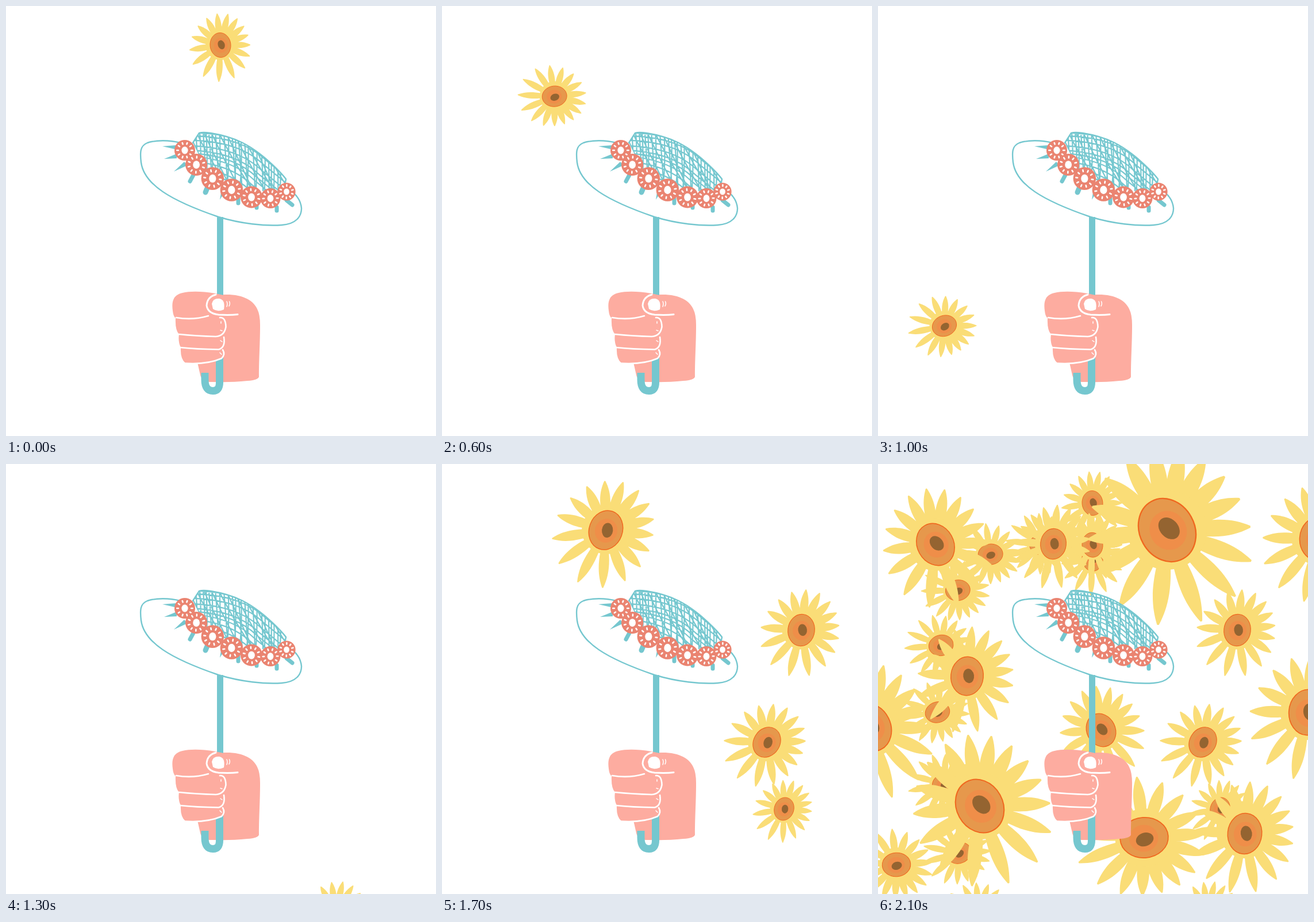
An HTML page for the animation above (2.2 s loop, 748x748 px).

```html
<!DOCTYPE html>
<html lang="en">
<head>
<meta charset="utf-8">
<title>Sunflowers and straw hat</title>
<style>
  html, body { margin: 0; width: 100%; height: 100%; overflow: hidden; background: #fff; }
  svg { display: block; width: 100vw; height: 100vh; }
  .teal { fill: none; stroke: #75c7cf; stroke-linecap: round; stroke-linejoin: round; }
  .leaf { fill: #75c7cf; stroke: none; }
  .skin { fill: #fdaca0; }
  .white { fill: none; stroke: #fff; stroke-width: 2.6; stroke-linecap: round; }
</style>
</head>
<body>
<svg viewBox="0 0 748 748">
  <defs>
    <g id="sunflower">
      <path id="petals" fill="#fadd77"/>
      <circle r="26" fill="#fadd77"/>
      <g transform="rotate(-6)">
        <ellipse rx="18" ry="21.5" fill="#e6984c" stroke="#f0681f" stroke-width=".9"/>
        <ellipse cx=".5" cy=".5" rx="12" ry="13" fill="#ef8e49"/>
        <ellipse cx="1.7" rx="6" ry="8" fill="#946431" transform="rotate(-14)"/>
      </g>
    </g>
    <clipPath id="crown">
      <path d="M325 238L336 221Q342 219 356 221C400 228 425 243 450 264C465 277 480 292 487 301L485 322H440L410 318L380 303L350 288Z"/>
    </clipPath>
  </defs>

  <g id="field"></g>

  <g class="teal" stroke-width="2.4">
    <path d="M303 238C285 233 260 233 246 238C233 243 233 255 235 272C240 310 285 338 370 367C410 379 450 383 480 381C505 379 514 366 514 352C513 340 508 332 500 325"/>
    <path d="M325 238L336 221Q342 219 356 221C400 228 425 243 450 264C465 277 480 292 487 301L485 312"/>
    <g clip-path="url(#crown)"><path id="weave" stroke-width="2.2"/></g>
    <path class="leaf" d="M272 244L298 242V250ZM275 266L297 257V265ZM292 288L310 271L316 277ZM372 337L375 318L382 321Z"/>
    <path stroke-width="7" d="M320 305L327 292M404 343V334M436 351V344M471 356V350M498 346L488 338"/>
    <path stroke-width="9" d="M347 324L352 312"/>
  </g>
  <g id="band"></g>

  <path class="skin" d="M366 503C400 499 427 506 437 527Q442 537 442 555C442 590 440 610 440 645Q438 651 420 652C395 655 370 654 354 654Q340 652 338 642L333 620Z"/>
  <g class="teal" style="stroke-linecap:butt">
    <path stroke-width="11" d="M372.5 367V655"/>
    <path stroke-width="13" d="M371.5 600V655Q371.5 669.5 360 669.5Q346 669.5 346 650V638"/>
  </g>

  <path class="skin" d="M378 503L364 500C340 496 320 496 307 499C290 503 288 515 290 530Q291 540 295 543Q294 564 301 571Q299 584 304 594Q303 614 312 621Q350 624 376 613Q382 605 378 597Q382 586 379 575Q384 562 382 549L404 530Z"/>
  <g class="white">
    <path d="M296 542Q325 547 352 539"/>
    <path d="M301 571Q330 574 365 575Q380 574 382.5 558Q382 541 372 542"/>
    <path d="M303 594Q330 597 370 597.5Q382 594 379 576"/>
    <path d="M311 621.5Q350 624 375 613Q382 606 377 598"/>
    <path stroke-width="3" d="M365 502Q350 506 349 521Q351 535 370 537Q390 538 403 536.5"/>
    <path style="stroke-width:1.5" d="M384 514Q386 518 384 523M388.5 514Q390.5 518 388 522M374 549V552M373 564L376 565M373 582L376 584M372 603L375 606"/>
    <path style="fill:#fff;stroke:none" d="M358 518Q360 508 371 509Q382 511 379 528Q368 533 360 527Z"/>
  </g>
</svg>
<script>
const $ = id => document.getElementById(id);
const { sin, cos, PI } = Math;
const loop = (n, make) => Array.from({ length: n }, (_, i) => make(i));

// Point on a cubic curve.
const curve = (t, ...points) => [0, 1].map(k => {
  const [a, b, c, d] = points.map(p => p[k]), u = 1 - t;
  return a * u ** 3 + 3 * b * u * u * t + 3 * c * u * t * t + d * t ** 3;
});

// Uneven ring of pointed petals; the longest one hangs straight down.
$("petals").setAttribute("d", loop(16, i => {
  const turn = i * PI / 8;
  const angle = PI / 2 + turn + .14 + .175 * sin(turn - .59);
  const length = 56 + 4 * cos(turn) + 4 * cos(2 * turn);
  const at = (along, side) => {
    const x = along * length;
    return `${x * cos(angle) - side * sin(angle)} ${x * sin(angle) + side * cos(angle)}`;
  };
  return `M0 0C${at(.5, 7.5)} ${at(.75, 7)} ${at(1, .6)}L${at(1, -.6)}C${at(.75, -7)} ${at(.5, -7.5)} 0 0Z`;
}).join(""));

// Straw weave: upright, curved and diagonal strands.
$("weave").setAttribute("d", [
  ...loop(28, i => `M${322 + i * 6.2 + 2 * sin(i * 7)} 212q5 58 ${3 + 6 * sin(i * 3)} 120`),
  ...loop(13, i => `M${336 - i * 4} ${221 + i * 7 + 2 * sin(i * 5)}q80 3 120 42q30 24 55 46`),
  ...loop(13, i => `M${298 + i * 13} 205q25 55 ${65 + 8 * sin(i * 4)} 125`)
].join(""));

// Round flowers strung along the hat band.
$("band").innerHTML = loop(7, i => {
  const [x, y] = curve(i / 6, [311, 251], [341, 300], [439, 362], [488, 323]);
  const r = 18 + 3 * sin(i * PI / 6) - i * .4;
  const dashes = loop(10, n => {
    const a = n * PI / 5 + i, c = r * cos(a), s = r * sin(a);
    return `M${c * .62} ${s * .62}L${c * .76} ${s * .76}`;
  });
  return `<g transform="translate(${x} ${y})"><circle r="${r}" fill="#ea8471"/>
    <ellipse rx="${r * .31}" ry="${r * .36}" fill="#fff"/>
    <path class="white" d="${dashes.join("")}"/></g>`;
}).join("");

const sunflower = (x, y, size, turn) =>
  `<use href="#sunflower" transform="translate(${x} ${y}) rotate(${turn}) scale(${size})"/>`;

// The small sunflower bounces on the hat, rolls off to the left and comes back from below.
function falling(step) {
  if (step < 5) return sunflower(373, 165 - 97 * (1 - Math.min(step, 3) / 2) ** 2, 1, 0);
  if (step > 12) return sunflower(573, 780, 1, 20);
  const [x, y] = curve((step - 5) / 7, [285, 140], [35, 117], [89, 568], [175, 780]);
  return sunflower(x, y, 1, 90 - 3.5 * (step - 6));
}

function field(step) {
  const late = step < 20 ? 0 : 1;
  const out = [];
  const bloom = (from, to, turn, ...spots) => {
    if (from <= step && step <= to) out.push(...spots.map(spot => sunflower(...spot, turn)));
  };

  if (step < 14) out.push(falling(step));
  if (step === 21) out.push(...loop(14, falling));

  // Climbing on the right, then leaping over the hat.
  [[595, 600, .94], [565, 484, 1.27], [625, 289, 1.29]].forEach((spot, i) =>
    bloom(14 + i, 21, 25 + 14 * sin(i * PI * 2 / 3), spot));
  bloom(17, 17, 26, [285, 115, 1.61]);

  // Filling the stage: upright, tilted and sideways ones.
  bloom(18, 21, 12, [305, 139, 1.24], [155, 369, 1.57], [638, 643, 1.65]);
  bloom(19, 21, 10, [748, 432, 1.85], [770 - 5 * late, 117 + 13 * late, 1.75]);
  bloom(18, 21, -23, [84 + 16 * late, 131 + 9 * late, 1.42 + .34 * late],
    [495 + 8 * late, 107 + 8 * late, 1.77 + .88 * late]);
  bloom(19, 21, -23, [177, 595, 2.6 - .36 * late]);
  bloom(20, 21, -20, [-14, 458, 2], [388, 463, 1.38]);
  bloom(19, 21, 92, [403 + 60 * late, 440 + 210 * late, 1.95]);
  bloom(20, 21, 92, [32, 697, 1.15]);
  return out.join("");
}

let shown = -1;
function draw(now) {
  const step = Math.floor(now % 2200 / 100);
  if (step !== shown) $("field").innerHTML = field(shown = step);
  requestAnimationFrame(draw);
}
draw(performance.now());
</script>
</body>
</html>
```
